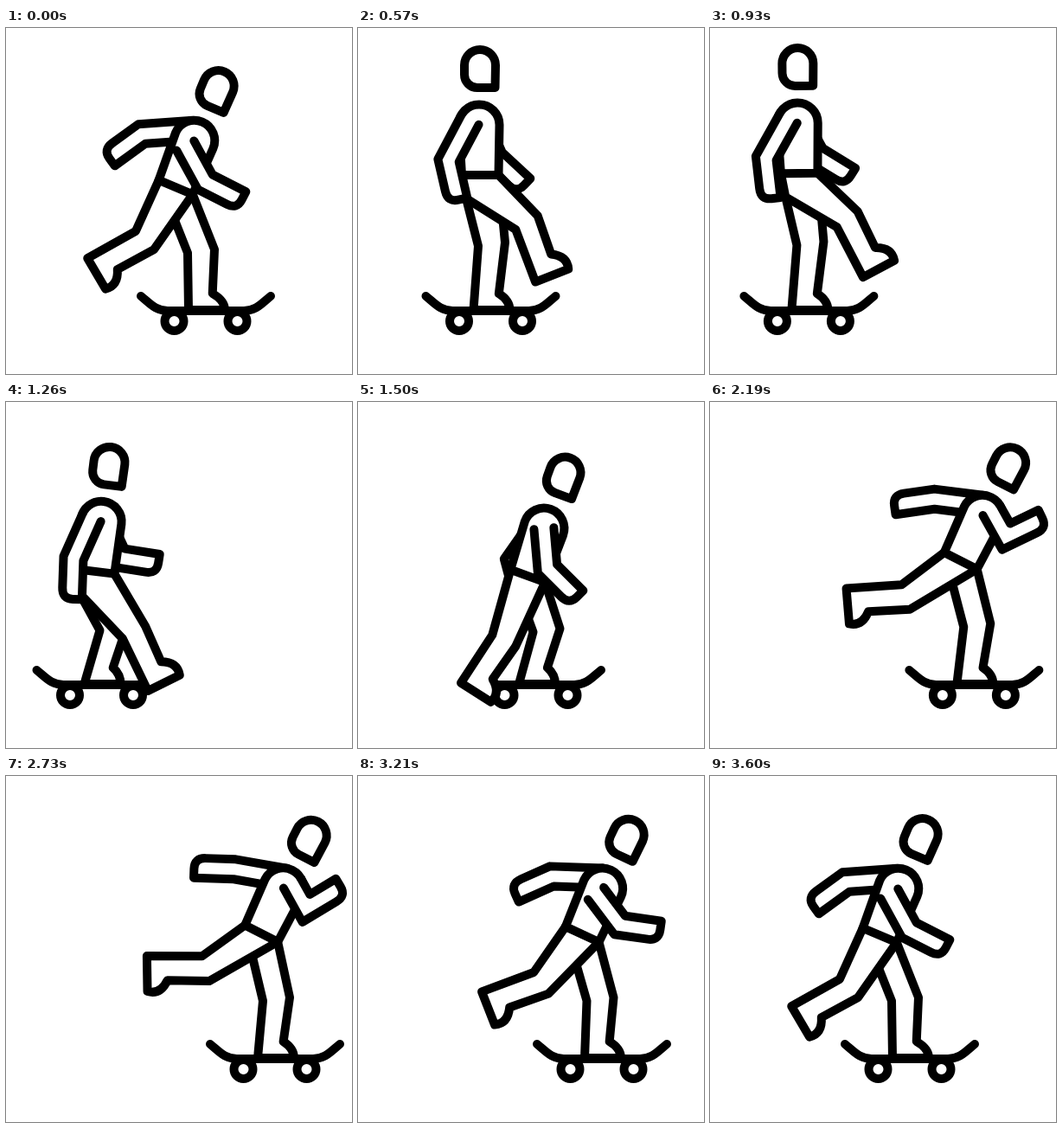
Write an HTML page with a canvas that moves like this. It is 400x400 px and loops after 3.66 s.

```html
<!DOCTYPE html>
<html lang="en">
<head>
<meta charset="utf-8">
<title>Skateboarder</title>
<style>
html, body { margin: 0; width: 100%; height: 100%; overflow: hidden; background: #fff; }
canvas { display: block; width: 400px; height: 400px; }
</style>
</head>
<body>
<canvas id="stage" width="400" height="400"></canvas>
<script>
const LOOP = 3660, CYCLE = 3600, STEP = 30;
const ctx = document.getElementById('stage').getContext('2d');
const rad = a => a * Math.PI / 180;

// Key poses; angles in degrees, limbs measured from straight down, forward positive.
// time, board x, waist offset from board, waist y, lean, knee offset from board, knee y
const BODY = [
  [0, 231, -35, 184, 23, -5.5, 258],
  [570, 153.5, -12.5, 170, 0, 1, 250],
  [840, 123, -12, 168, -1, 1, 249],
  [1080, 104.5, -10, 172, 1, 4, 251],
  [1260, 110.5, -6.5, 196, 7, 13.5, 262],
  [1400, 160, -8, 203, 14, 14, 265],
  [1500, 206, -10, 201, 20, 12, 264],
  [1770, 281.5, -14, 189.5, 26, 7.5, 260],
  [2250, 307, -16, 183, 27, 3, 258],
  [2730, 311, -16, 182, 27, 1.5, 258],
  [3210, 282, -23, 183, 25, -2, 258]
];
// time, thigh angle, thigh length, shin angle
const LEG = [
  [0, -30, 71, -61],
  [290, 12, 73, -30],
  [570, 44.5, 77, 20],
  [840, 47, 77, 26],
  [1080, 43, 78, 27],
  [1260, 32, 83, 25],
  [1400, 8, 82, 2],
  [1500, -20, 80, -34],
  [1770, -46.6, 76, -69],
  [2250, -57, 76, -88],
  [2730, -57.7, 76, -90.5],
  [3210, -40, 73.5, -70]
];
// time, upper angle, upper length, forearm angle, shift across the shoulder
const NEAR_ARM = [
  [0, 28.7, 48, 63, -1],
  [570, -28, 53, 13, -1],
  [1080, -27, 53, 5, -1],
  [1260, -24, 52, -2, -1],
  [1500, 5, 47, 45, 0],
  [1770, 29, 41, 98, 1],
  [2250, 29, 34, 117, 1],
  [2730, 29, 33, 121, 1],
  [3210, 37, 46, 82, -0.8]
];
const FAR_ARM = [
  [0, -86, 60, -54, -1],
  [570, 24, 42, 47, 0],
  [1080, 26, 44, 62, 0],
  [1260, 25, 46, 81, 0],
  [1500, -35, 50, 15, -0.5],
  [1770, -84, 51, -44, -1],
  [2250, -98, 58, -85, -1],
  [2730, -100, 59, -92, -1],
  [3210, -92, 59, -66, -1]
];

// Smooth periodic curve through the keys of a track.
function sample(track, t) {
  const n = track.length;
  const key = i => track[(i + n) % n];
  const time = i => key(i)[0] + CYCLE * Math.floor(i / n);
  let i = n - 1;
  while (track[i][0] > t) i--;
  const t0 = time(i - 1), t1 = time(i), t2 = time(i + 1), t3 = time(i + 2);
  const d = t2 - t1, u = (t - t1) / d, v = 1 - u;
  return key(i).slice(1).map((p1, j) => {
    const [p0, p2, p3] = [i - 1, i + 1, i + 2].map(k => key(k)[j + 1]);
    const m1 = (p2 - p0) / (t2 - t0) * d, m2 = (p3 - p1) / (t3 - t1) * d;
    return v * v * (1 + 2 * u) * p1 + u * v * v * m1 + u * u * (3 - 2 * u) * p2 - u * u * v * m2;
  });
}

// Point at distance `along` a limb and `across` it towards its front.
function at([x, y], angle, along, across = 0) {
  const s = Math.sin(rad(angle)), c = Math.cos(rad(angle));
  return [x + along * s + across * c, y + along * c - across * s];
}

const line = points => points.forEach(p => ctx.lineTo(...p));
const curve = (control, end) => ctx.quadraticCurveTo(...control, ...end);

function shape(build) {
  ctx.beginPath();
  build();
  ctx.fill();
  ctx.stroke();
}

function board(x) {
  ctx.beginPath();
  ctx.moveTo(x - 75, 310);
  ctx.bezierCurveTo(x - 64, 319, x - 58, 327, x - 44, 327);
  ctx.lineTo(x + 44, 327);
  ctx.bezierCurveTo(x + 58, 327, x + 64, 319, x + 75, 310);
  ctx.stroke();
  for (const dx of [-36.5, 36.5]) shape(() => ctx.arc(x + dx, 339, 11, 0, 7));
}

function arm(shoulder, [upper, length, fore, shift]) {
  const w = 11.5, reach = 47, mid = (upper + fore) / 2;
  const miter = w / Math.cos(rad((fore - upper) / 2));
  const root = at(shoulder, upper, 0, 12 * shift);
  const elbow = at(root, upper, length);
  shape(() => {
    line([at(root, upper, 0, -w), at(elbow, mid, 0, -miter), at(elbow, fore, reach - 13, -w)]);
    curve(at(elbow, fore, reach, -w), at(elbow, fore, reach, 1));
    line([at(elbow, fore, reach, w), at(elbow, mid, 0, miter), at(root, upper, 0, w)]);
  });
}

function standingLeg(hips, x, kneeX, kneeY) {
  const back = [x + kneeX - 15.5, kneeY + 2], front = [x + kneeX + 15.5, kneeY - 2];
  const heel = x - 20;
  const lean = (back[0] - heel) / (326 - back[1]);
  const ankle = [heel + 28 + lean * 18, 307];
  shape(() => {
    line([hips.back, hips.seat, back, [heel, 326], [x + 22, 326]]);
    curve([x + 22, 315], ankle);
    line([front, hips.front]);
  });
}

function swingLeg(hips, [thigh, length, shin]) {
  const knee = at(hips.mid, thigh, length), mid = (thigh + shin) / 2;
  const foot = (along, across) => at(knee, shin, along, across);
  shape(() => {
    line([hips.back, hips.seat, at(knee, mid, 0, -15), foot(68, -14), foot(67, 27)]);
    curve(foot(52, 31), foot(44, 14));
    line([at(knee, mid, 0, 15), hips.front]);
  });
}

function leaning([x, y], lean, build) {
  ctx.save();
  ctx.translate(x, y);
  ctx.rotate(rad(lean));
  shape(build);
  ctx.restore();
}

function torso() {
  ctx.moveTo(-21, 0);
  ctx.arc(-1, -58, 23.5, Math.PI, 0);
  ctx.lineTo(21.5, 0);
  ctx.closePath();
}

function head() {
  ctx.moveTo(17.5, -101);
  ctx.arc(0, -127, 18, 0, Math.PI, true);
  ctx.arcTo(-18, -101, 0, -101, 15);
  ctx.closePath();
}

function draw(t) {
  const [x, dx, y, lean, kneeX, kneeY] = sample(BODY, t);
  const leg = sample(LEG, t);
  const waist = [x + dx, y];
  const seat = Math.min(1, Math.max(0, (leg[0] + 10) / 42));
  const hips = {
    mid: waist,
    back: at(waist, -lean, 0, -21),
    seat: at(waist, -lean, 27 * seat, -21 + 5 * seat),
    front: at(waist, -lean, 0, 21.5)
  };
  const shoulder = at(waist, -lean, -58, -1);

  ctx.fillStyle = '#fff';
  ctx.fillRect(0, 0, 400, 400);
  ctx.strokeStyle = '#000';
  ctx.lineWidth = 10;
  ctx.lineCap = ctx.lineJoin = 'round';

  board(x);
  arm(shoulder, sample(FAR_ARM, t));
  standingLeg(hips, x, kneeX, kneeY);
  swingLeg(hips, leg);
  leaning(waist, lean, torso);
  arm(shoulder, sample(NEAR_ARM, t));
  leaning(waist, lean, head);
}

function tick() {
  const t = performance.now() % LOOP;
  // The last step holds the opening pose.
  draw(Math.floor(t / STEP) * STEP % CYCLE * (t < CYCLE));
  requestAnimationFrame(tick);
}
tick();
</script>
</body>
</html>
```
